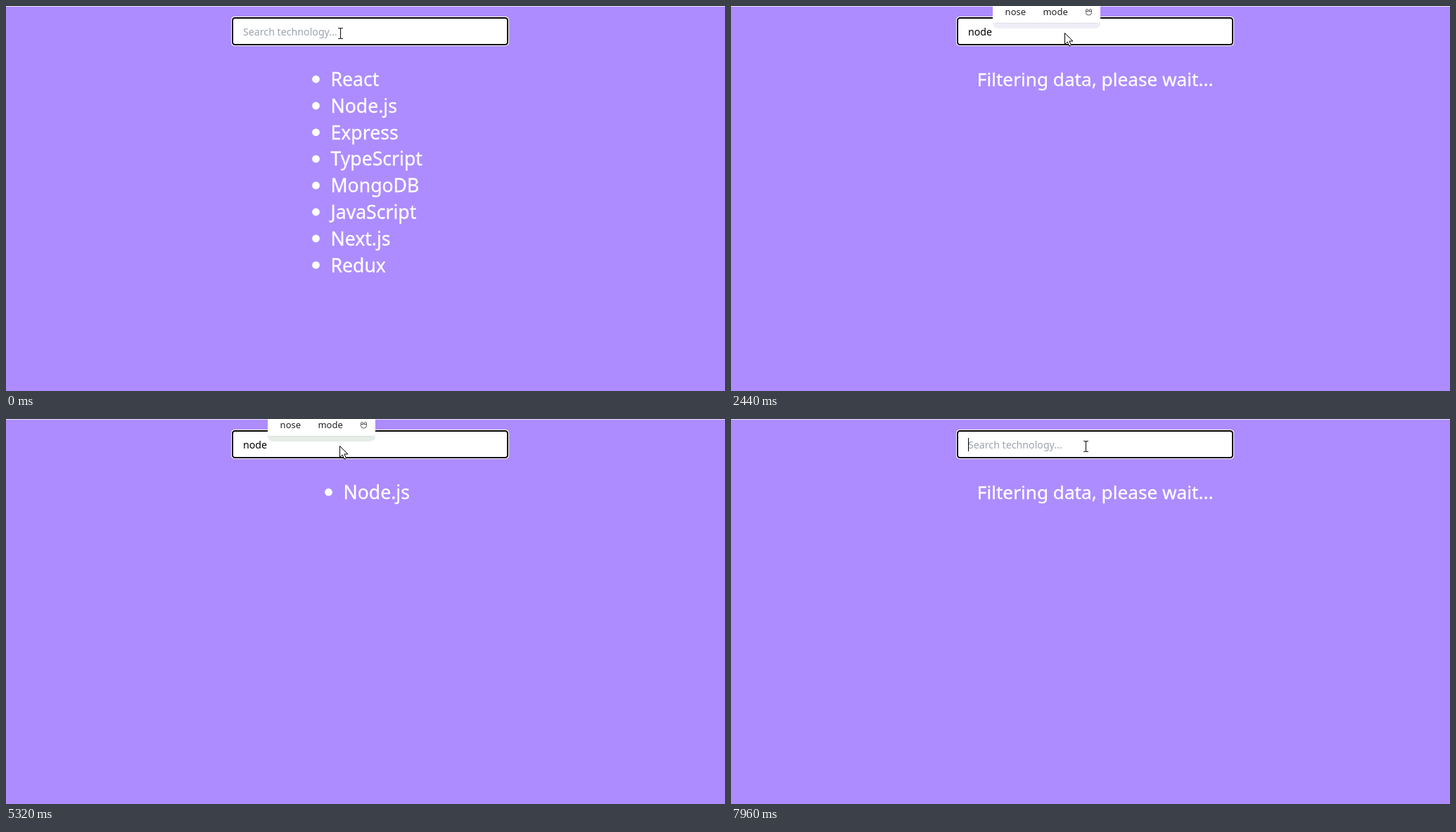
Recreate the animation shown at these times as an HTML page. Size 1022 px wide and 548 px high, loop 8000 ms.

```html
<!DOCTYPE html>
<html lang="en">
<head>
<meta charset="utf-8">
<title>Debounced search</title>
<style>
  html, body { margin: 0; width: 100%; height: 100%; overflow: hidden; background: #ad8cff; }
  svg { display: block; width: 1022px; height: 548px; font-family: "Noto Sans", "Open Sans", sans-serif; }
  .big { font-size: 26.6px; fill: #fff; stroke: #fff; stroke-width: .3; }
  .mid { font-size: 26.2px; text-anchor: middle; }
  .field { font-size: 14.2px; }
  .hint { font-size: 13px; fill: #222; }
</style>
</head>
<body>
<svg viewBox="0 0 1022 548">
  <rect width="1022" height="548" fill="#ad8cff"/>
  <rect width="1022" height="1" fill="#e6e4ec"/>

  <rect x="320" y="15" width="395" height="42" rx="5" fill="#fff"/>
  <rect x="322" y="17" width="391" height="38" rx="3.5" fill="#fff" stroke="#000" stroke-width="2"/>
  <text id="typed" class="field" x="337" y="41.5"></text>
  <text id="placeholder" class="field" x="337" y="41.5" fill="#9ca3af">Search technology...</text>
  <rect id="caret" y="27" width="1" height="19"/>

  <text id="status" class="big mid" x="517.7" y="114"></text>
  <g id="list"></g>

  <g id="popup">
    <path id="shade" d="M372 20H525V24Q525 32 516 32H381Q372 32 372 24Z"/>
    <path d="M372 0H525V20Q525 24.5 520 24.5H377Q372 24.5 372 20Z" fill="#fff"/>
    <path d="M376 24.5H521" stroke="#d9d9df" stroke-width=".8"/>
    <text class="hint" x="389.6" y="13">nose</text>
    <text class="hint" x="443.4" y="13">mode</text>
    <path d="M504.500 7.500V9.500q0 3.500 4 3.500t4-3.500V7.500M504.500 7.500q-.5-3 1.500-3t2 3zM512.500 7.500q.5-3-1.500-3t-2 3z" fill="none" stroke="#444" stroke-width=".9"/>
  </g>

  <path id="arrow" d="M0 0V16l3.700-3.500 2.700 6 2.600-1.200-2.600-5.800h5z" fill="#fff" stroke="#000"/>
  <path id="beam" d="M-3.500-7h2.500l1 1 1-1h2.500M0-6V7M-3.500 8h2.500l1-1 1 1h2.500" fill="none" stroke="#222" stroke-width="1.200"/>
</svg>
<script>
const LOOP = 8000, BLINK = 530;
const KEYS = [360, 520, 660, 800];
const POPUP = 820, FILTER = 2300, RESULT = 4300, CLEAR = 6420, REFILTER = 7920;
const ITEMS = ["React", "Node.js", "Express", "TypeScript", "MongoDB", "JavaScript", "Next.js", "Redux"];
const CARETS = [337, 346, 354, 363, 371];

const $ = id => document.getElementById(id);
const show = (id, on) => $(id).setAttribute("visibility", on ? "visible" : "hidden");
const move = (id, x, y) => $(id).setAttribute("transform", `translate(${x} ${y})`);
const clamp = v => Math.min(1, Math.max(0, v));
const ease = (t, from, to) => {
  const p = clamp((t - from) / (to - from));
  return p * p * (3 - 2 * p);
};

function makeList(names, x) {
  return names.map((name, i) => {
    const y = i * 37.8;
    return `<circle cx="${x - 21}" cy="${104.2 + y}" r="5.4" fill="#fff"/>` +
      `<text class="big" x="${x}" y="${114 + y}">${name}</text>`;
  }).join("");
}
const FULL = makeList(ITEMS, 461.5), FOUND = makeList(["Node.js"], 479.5);
let shown = "";

function caretOn(t, count) {
  if (t < KEYS[0] || (t > 4510 && t < CLEAR)) return false;
  const last = t >= CLEAR ? CLEAR : KEYS[count - 1];
  return Math.floor((t - last) / BLINK) % 2 === 0;
}

function draw(t) {
  const cleared = t >= CLEAR;
  const count = cleared ? 0 : KEYS.filter(k => t >= k).length;
  const filtering = (t >= FILTER && t < RESULT) || t >= REFILTER;
  const idle = t < KEYS[0], found = t >= RESULT && !cleared;

  $("typed").textContent = "node".slice(0, count);
  show("placeholder", count === 0);
  show("caret", caretOn(t, count));
  $("caret").setAttribute("x", CARETS[count]);

  const list = idle ? FULL : found ? FOUND : "";
  if (list !== shown) $("list").innerHTML = shown = list;
  $("status").textContent = list ? "" :
    filtering ? "Filtering data, please wait..." : "Debounce start, please wait...";

  const popup = t >= POPUP && !cleared;
  show("popup", popup);
  $("popup").setAttribute("opacity", clamp((t - POPUP) / 120));
  $("shade").setAttribute("fill", filtering ? "#efeef8" : "#e5ede6");

  const nudge = ease(t, 5960, 6320), slide = ease(t, CLEAR, 7400);
  show("arrow", popup);
  show("beam", !popup);
  move("arrow", 474.5 + 2.5 * nudge, 38.5 + 2.5 * nudge);
  move("beam", 475.5 + 2.5 * nudge + 26.5 * slide, 38.5 + 2.5 * (nudge - slide));
}

const start = performance.now();
function tick(now) {
  draw(Math.max(0, now - start) % LOOP);
  requestAnimationFrame(tick);
}
draw(0);
requestAnimationFrame(tick);
</script>
</body>
</html>
```
